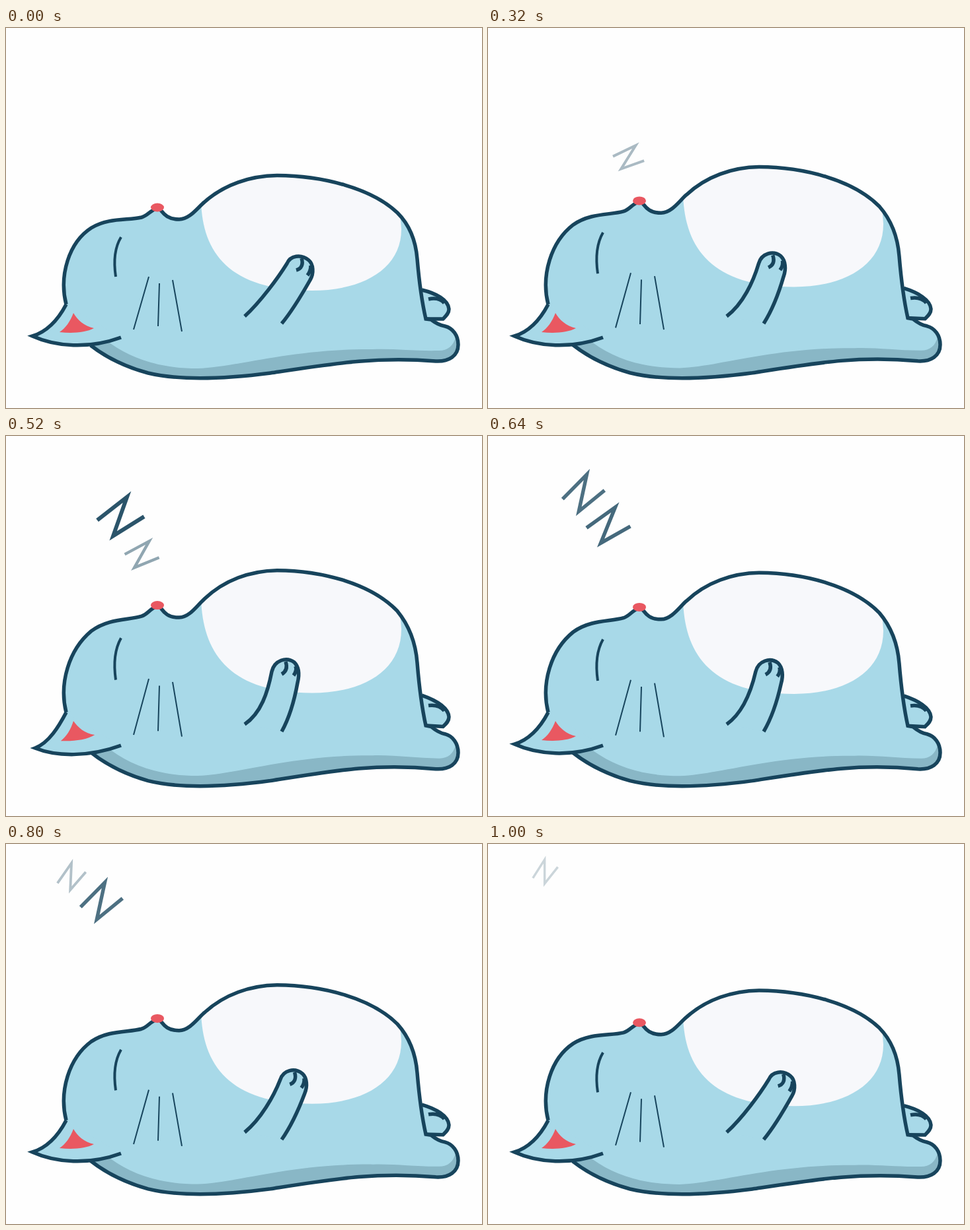
An HTML page for the animation above (1.04 s loop, 720 px wide and 576 px high).

```html
<!DOCTYPE html>
<html lang="en">
<head>
<meta charset="utf-8">
<title>Sleeping cat</title>
<style>
  html, body { margin: 0; width: 100%; height: 100%; overflow: hidden; background: #fefefe; }
  svg { display: block; width: 100vw; height: 100vh; }
  .line { fill: none; stroke: #17445c; stroke-width: 5.5; stroke-miterlimit: 10; }
  .skin { fill: #a8d9e8; }
  .red { fill: #e95861; }
</style>
</head>
<body>
<svg id="stage" viewBox="0 0 720 576">
  <clipPath id="bodyClip"><path id="clip"/></clipPath>
</svg>
<script>
const LOOP = 1040, STEP = 40;
const stage = document.getElementById('stage');

function set(el, attrs) {
  for (const key in attrs) el.setAttribute(key, attrs[key]);
  return el;
}

function add(tag, cls, attrs = {}) {
  const el = document.createElementNS('http://www.w3.org/2000/svg', tag);
  return set(stage.appendChild(el), { class: cls, ...attrs });
}

const mix = (a, b, t) => a + (b - a) * t;

function smoothstep(a, b, x) {
  const t = Math.max(0, Math.min(1, (x - a) / (b - a)));
  return t * t * (3 - 2 * t);
}

// The breath stretches the cat upwards from the floor, least at head and feet.
function liftY(x, y, breath) {
  const head = 1 - Math.exp(-Math.max(0, x - 91) / 55);
  const feet = 1 - smoothstep(570, 680, x);
  return y - breath * .065 * Math.max(0, 530 - y) * head * feet;
}

function inflate(d, breath) {
  return d.replace(/([\d.]+),([\d.]+)/g, (_, x, y) => `${x},${liftY(+x, +y, breath).toFixed(2)}`);
}

function morph(from, to, t) {
  const target = to.match(/[\d.]+/g);
  let i = 0;
  return from.replace(/[\d.]+/g, n => mix(+n, +target[i++], t).toFixed(2));
}

const underside = 'C684,497 670,506 650,505 C560,498 500,508 400,523 ' +
  'C330,532 265,535 215,523 C185,515 155,502 128,481';
const outline = 'M91,419 C80,375 95,325 129,303 C155,287 185,292 205,287 C215,284 217,277 229,273 ' +
  'C236,272 236,290 262,290 C278,290 290,272 300,264 C330,237 370,224 410,223.5 ' +
  'C480,224 553,243 592,280 C611,299 620,325 622,350 C625,385 629,415 635,441 ' +
  'L643,442 C652,449 658,451 664,452 C676,455 684,466 684,480 ' + underside;

// Parts that swell with the breath, back to front.
const soft = [[document.getElementById('clip'), outline]];
function softPath(cls, d, attrs) {
  soft.push([add('path', cls, attrs), d]);
}

softPath('line', 'M629,397 C650,402 669,412 670,426 C670,433 665,437 661,441 L633,441', { style: 'fill:#a8d9e8' });
softPath('line', 'M639,411 C648,409 657,410 663,417');
softPath('skin', outline);
softPath('shade', 'M128,481 L150,472 C185,500 230,516 290,516 C350,514 430,486 555,487 ' +
  'C590,486 620,490 655,489 C668,489 677,482 680,468 L684,480 ' + underside, { fill: '#89b7c6' });
softPath('belly', 'M295,262 C297,340 337,398 463,398 C540,398 598,365 598,305 L596,280 L596,150 L295,150 Z',
  { fill: '#f7f8fb', 'clip-path': 'url(#bodyClip)' });
softPath('line', outline);
softPath('line', 'M174,317 C163,335 163,357 166,377', { style: 'stroke-width:4' });
softPath('line', 'M216,377 L193,457 M232,387 L230,452 M252,382 L266,460', { style: 'stroke-width:2' });

const ear = add('path', 'line', { style: 'fill:#a8d9e8' });
const innerEar = add('path', 'red', {
  d: 'M102,432 C97,445 90,455 81,461 C100,463 120,462 133,455 C118,452 108,442 102,432'
});
const nose = add('ellipse', 'red', { cx: 229, rx: 10, ry: 6.5 });

// Arm and fingers, resting and raised.
const limbs = [
  ['M361,437 C385,415 412,378 425,357 C430,345 446,342 458,352 C465,358 466,372 460,382 C447,405 432,430 417,448',
   'M361,437 C386,420 396,388 402,357 C406,340 424,334 436,343 C443,350 444,362 441,374 C436,402 428,428 417,448'],
  ['M447,349 C450,358 447,365 439,367 M461,360 C461,367 459,371 456,375',
   'M423,342 C426,351 424,357 417,361 M438,349 C440,355 438,359 435,363']
].map(([rest, raised], i) => ({
  rest, raised, el: add('path', 'line', { style: i ? '' : 'fill:#a8d9e8' })
}));

const snores = [200, 360].map(start => ({
  start, el: add('path', 'line', { d: 'M-35,7 L9,-30 L-10,30 L36,-1', style: 'stroke-width:6' })
}));

// A snore curves up and away, largest and darkest halfway.
function drawSnore({ el, start }, t) {
  const p = (t - start) / 680;
  const far = Math.abs(p - .52);
  const x = 231 - 92 * p - 66 * p * p;
  const y = 249 - 320 * p + 106 * p * p;
  set(el, {
    transform: `translate(${x} ${y}) rotate(${21.5 - 41.5 * p}) scale(${1.05 - 1.12 * far})`,
    opacity: p > 0 && p < 1 ? 1 - 1.85 * far : 0
  });
}

function drawEar(w) {
  set(ear, { d: `M91,419 C80,440 ${63 + 2 * w},${460 + 5 * w} ${40 + 4 * w},${467 + 6 * w} ` +
    `C${75 + w},${483 + 3 * w} 125,487 174,469` });
  set(innerEar, { transform: `rotate(${-3.4 * w} 102 432)` });
}

function draw(t) {
  const breath = Math.min(1, t / 490, (LOOP - t) / 490);
  const swing = Math.sin(Math.PI * t / LOOP) ** 2;
  for (const [el, d] of soft) set(el, { d: inflate(d, breath) });
  set(nose, { cy: liftY(229, 272, breath) });
  for (const { el, rest, raised } of limbs) set(el, { d: morph(rest, raised, swing) });
  drawEar(Math.exp(-(((t - 520) / 60) ** 2)));
  for (const snore of snores) drawSnore(snore, t);
}

function tick() {
  draw(Math.floor(performance.now() % LOOP / STEP) * STEP);
  requestAnimationFrame(tick);
}
tick();
</script>
</body>
</html>
```
